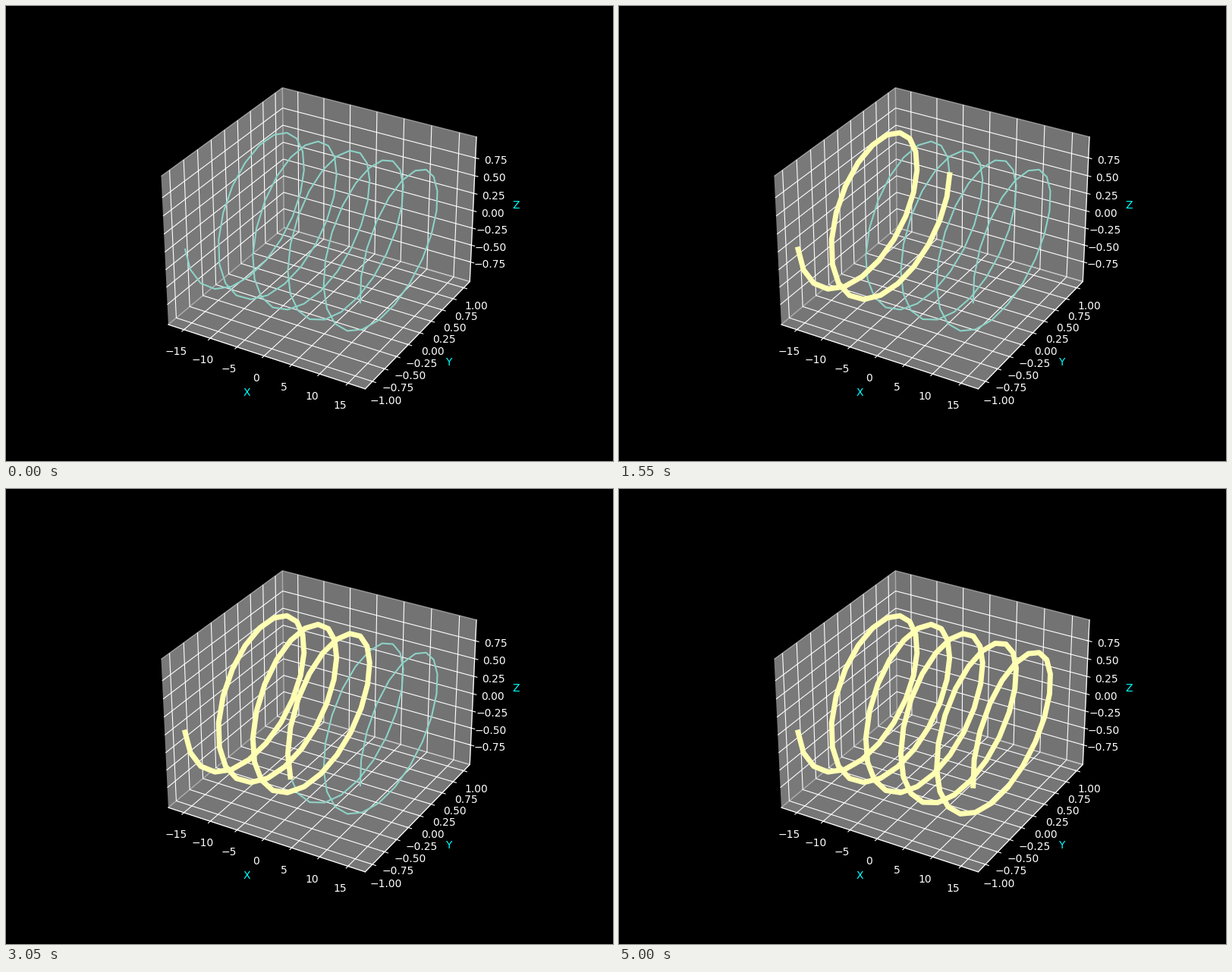
Recreate the animation shown at these times as a matplotlib script. Size 800x600 px, loop 5050 ms.

```python
import numpy as np
import matplotlib.pyplot as plt
from matplotlib.animation import FuncAnimation

POINTS = 100
INTERVAL = 50  # ms

plt.style.use("dark_background")


def padded(values, margin):
    """Limits with a data margin plus the small gap to the box walls."""
    low, high = values.min(), values.max()
    gap = margin * (high - low)
    low, high = low - gap, high + gap
    wall = (high - low) / 48
    return low - wall, high + wall


x = np.linspace(-5 * np.pi, 5 * np.pi, POINTS)
y, z = np.cos(x), np.sin(x)

fig = plt.figure(figsize=(8, 6), dpi=100)
ax = fig.add_subplot(projection="3d")
ax.plot(x, y, z, lw=1.5)
trace, = ax.plot([], [], [], lw=5)

ax.set_xlim(padded(x, 0.05))
ax.set_ylim(padded(y, 0.05))
ax.set_zlim(padded(z, 0))
ax.set_xticks(np.arange(-15, 16, 5))
ax.set_yticks(np.arange(-1, 1.01, 0.25))
ax.set_zticks(np.arange(-0.75, 0.76, 0.25))
ax.set_xlabel("X", color="cyan")
ax.set_ylabel("Y", color="cyan")
ax.set_zlabel("Z", color="cyan")


def update(count):
    trace.set_data_3d(x[:count], y[:count], z[:count])
    return trace,


anim = FuncAnimation(fig, update, frames=POINTS + 1, interval=INTERVAL,
                     repeat=True, repeat_delay=0)
plt.show()
```
